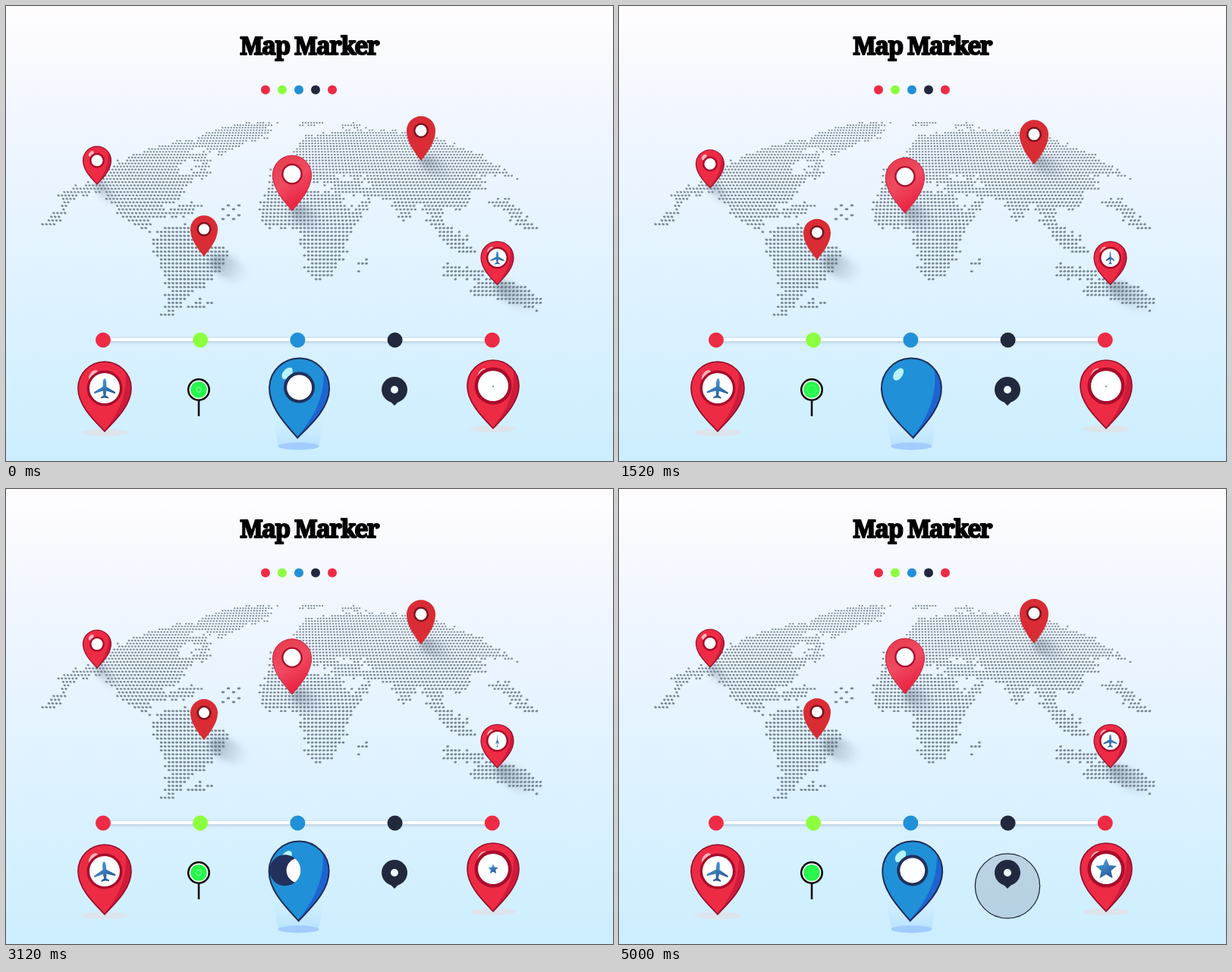
An HTML page with a canvas for the animation above (5040 ms loop, 800 px wide and 600 px high).

```html
<!DOCTYPE html>
<html lang="en">
<head>
<meta charset="utf-8">
<title>Map Marker</title>
<style>
  html, body { margin: 0; width: 100%; height: 100%; overflow: hidden; }
  canvas { display: block; }
</style>
</head>
<body>
<canvas id="stage" width="800" height="600"></canvas>
<script>
const LOOP = 5040, TAU = Math.PI * 2;
const RED = '#ee2b45', GREEN = '#8cff3f', BLUE = '#2090d8', DARK = '#22293f';
const COLORS = [RED, GREEN, BLUE, DARK, RED];

const stage = document.getElementById('stage').getContext('2d');
const backdrop = document.createElement('canvas');
backdrop.width = 800;
backdrop.height = 600;

const northLand = [
  'M118 235L146 206L180 190L226 178L264 176L240 198L262 190L272 222L240 234L236 248L206 270L200 284L186 282L194 298L180 297L158 284L134 256Z',
  'M47 291L58 276L72 266L70 246L100 235L122 230L122 246L94 250L80 262L72 284Z',
  'M238 186L262 166L310 155L354 152L340 174L310 182L288 197L262 186Z',
  'M203 271L240 259L266 262L232 278L205 280Z'
];
const southLand = [
  'M208 290L246 288L262 312L292 318L290 335L276 358L250 375L232 392L216 412L204 410L214 378L206 350L193 325L196 305Z',
  'M238 398L252 385L268 392L262 400Z',
  'M342 243L392 236L440 246L452 268L483 251L470 276L454 298L448 325L430 354L412 366L398 352L392 318L384 296L344 291L332 278Z',
  'M464 334L475 330L471 350L463 351Z',
  'M612 369L640 357L690 372L705 386L696 402L668 392L640 384L616 385Z'
];
const eastLand = [
  'M346 240L352 214L378 200L384 182L398 170L440 165L490 163L520 165L570 176L625 196L680 230L650 222L625 225L632 245L610 240L614 262L592 270L580 262L575 285L566 270L545 262L522 288L508 258L478 250L440 247L400 240L376 234Z',
  'M545 262L572 268L580 292L604 304L618 322L600 330L586 320L568 300Z',
  'M636 258L662 252L700 294L690 301L664 279Z',
  'M566 338L588 342L640 350L628 361L585 359Z',
  'M388 152L418 152L416 158L388 158ZM440 154L472 156L472 161L440 159Z'
];
// Bays and inland seas
const water = 'M222 216L242 200L256 208L238 224ZM376 240L396 230L424 236L432 247L400 242ZM434 224L452 222L456 232L440 231ZM466 224L474 222L478 240L470 238Z';

function disc(c, x, y, r, color) {
  c.beginPath();
  c.arc(x, y, r, 0, TAU);
  c.fillStyle = color;
  c.fill();
}

function oval(c, x, y, rx, ry, color, angle = 0) {
  c.beginPath();
  c.ellipse(x, y, rx, ry, angle, 0, TAU);
  c.fillStyle = color;
  c.fill();
}

function drop(x, y, r, tip) {
  const p = new Path2D(), h = tip - y;
  p.moveTo(x, tip);
  p.bezierCurveTo(x - r * .33, y + h * .78, x - r, y + h * .42, x - r, y);
  p.arc(x, y, r, Math.PI, TAU);
  p.bezierCurveTo(x + r, y + h * .42, x + r * .33, y + h * .78, x, tip);
  p.closePath();
  return p;
}

// Glossy drop with a darker right flank and an outline
function glossy(c, x, y, r, tip, [fill, flank, edge, shine]) {
  const body = drop(x, y, r, tip);
  c.save();
  c.clip(body);
  c.fillStyle = flank;
  c.fill(body);
  c.beginPath();
  c.moveTo(x - r, tip);
  c.lineTo(x - r * .04, tip);
  c.quadraticCurveTo(x + r * .92, y + r * .5, x + r * .78, y - r * .65);
  c.lineTo(x + r * .5, y - r * 1.1);
  c.lineTo(x - r * 1.1, y - r * 1.1);
  c.fillStyle = fill;
  c.fill();
  oval(c, x - r * .42, y - r * .48, r * .23, r * .14, shine, -.9);
  c.restore();
  c.strokeStyle = edge;
  c.lineWidth = Math.max(1.2, r * .05);
  c.stroke(body);
}

const redSkin = [RED, '#cf1b3b', '#95102c', '#ffb3ba'];
const blueSkin = [BLUE, '#1d64d2', '#1f2b55', '#b8f4ff'];

function redPin(c, x, y, r, tip, ring, hole) {
  glossy(c, x, y, r, tip, redSkin);
  disc(c, x, y, ring, '#a80c2b');
  disc(c, x, y, hole, '#fff');
}

function flatPin(c, x, y, r, tip, ring, hole) {
  c.fillStyle = '#d92c34';
  c.fill(drop(x, y, r, tip));
  disc(c, x, y, ring, '#7c1220');
  disc(c, x, y, hole, '#fff');
}

function centerPin(c, dy) {
  const body = drop(377, 222.5 + dy, 25.5, 270 + dy);
  const g = c.createLinearGradient(355, 200 + dy, 395, 260 + dy);
  g.addColorStop(0, '#e63c4c');
  g.addColorStop(.5, '#f04a61');
  g.addColorStop(1, '#e91f3e');
  c.fillStyle = g;
  c.fill(body);
  c.strokeStyle = '#c91f38';
  c.lineWidth = 1;
  c.stroke(body);
  disc(c, 377, 221.5 + dy, 13.8, '#a8122e');
  disc(c, 377, 221.5 + dy, 11.4, '#fff');
}

function polygon(c, points, top, bottom) {
  const g = c.createLinearGradient(-8, -14, 8, 14);
  g.addColorStop(0, top);
  g.addColorStop(1, bottom);
  c.beginPath();
  points.forEach(([x, y]) => c.lineTo(x, y));
  c.closePath();
  c.fillStyle = g;
  c.fill();
}

const wing = [[0, -14], [1.6, -12.5], [2.3, -9], [2.3, -3], [14, 4], [14, 6.2], [2.3, 2.6], [1.5, 8.5], [5.2, 11], [5.2, 12.6], [0, 11.6]];
const planeShape = [...wing, ...wing.map(([x, y]) => [-x, y]).reverse()];
const starShape = Array.from({ length: 10 }, (_, i) => {
  const r = i % 2 ? 6.8 : 14.5, a = i * TAU / 10;
  return [r * Math.sin(a), -r * Math.cos(a)];
});

function icon(c, shape, x, y, sx, sy, angle = 0) {
  c.save();
  c.translate(x, y);
  c.rotate(angle);
  c.scale(sx, sy);
  polygon(c, shape, '#4aa5e6', '#234a86');
  c.restore();
}

function smudge(c, x, y, length, width, angle) {
  c.save();
  c.translate(x, y);
  c.rotate(angle);
  c.filter = 'blur(4px)';
  const g = c.createLinearGradient(0, 0, length, 0);
  g.addColorStop(0, 'rgba(80,95,110,.5)');
  g.addColorStop(1, 'rgba(130,150,165,0)');
  oval(c, length / 2, 0, length / 2, width, g);
  c.restore();
}

function drawMap(c) {
  const land = new Path2D([...northLand, ...southLand, ...eastLand].join(''));
  const sea = new Path2D(water);
  c.fillStyle = '#7a8894';
  for (let y = 154; y < 414; y += Math.min(5.2, 3.2 + (y - 150) / 75)) {
    const spread = Math.min(1, .72 + (y - 150) / 500);
    const size = Math.min(1, .62 + (y - 150) / 400);
    for (let u = -420; u < 420; u += 5.1) {
      const x = 385 + u * spread;
      // Wobble the lookup so that the coasts come out ragged
      const px = x + 4 * Math.sin(y * .8 + x * .23);
      const py = y + 2 * Math.sin(x * .41 + y * .3);
      if (!c.isPointInPath(land, px, py) || c.isPointInPath(sea, px, py)) continue;
      c.beginPath();
      c.ellipse(x, y, 1.95 * size, 1.45 * size, -u / 900, 0, TAU);
      c.fill();
    }
  }
  for (let i = 0; i < 8; i++) {
    oval(c, 286 + i % 4 * 7, 268 + (i >> 2) * 13 - i % 2 * 5, 2.4, 1.4, '#7a8894');
  }
}

function drawBackdrop(c) {
  const sky = c.createLinearGradient(0, 0, 0, 600);
  sky.addColorStop(0, '#fffdfe');
  sky.addColorStop(.25, '#f1f6ff');
  sky.addColorStop(1, '#cceeff');
  c.fillStyle = sky;
  c.fillRect(0, 0, 800, 600);

  c.font = '900 32px "Noto Serif", serif';
  c.textAlign = 'center';
  c.letterSpacing = '-1.7px';
  c.fillStyle = c.strokeStyle = '#000';
  c.lineWidth = 1.8;
  c.lineJoin = 'round';
  c.fillText('Map Marker', 399.5, 63.5);
  c.strokeText('Map Marker', 399.5, 63.5);

  drawMap(c);
  smudge(c, 119, 232, 42, 7, .85);
  smudge(c, 270, 334, 54, 14, .45);
  smudge(c, 377, 266, 50, 13, .6);
  smudge(c, 546, 201, 50, 11, .5);
  smudge(c, 645, 366, 66, 12, .55);

  c.save();
  c.shadowColor = 'rgba(90,100,120,.35)';
  c.shadowBlur = 4;
  c.shadowOffsetY = 1;
  c.fillStyle = '#fff';
  c.fillRect(128, 438, 513, 4);
  c.restore();
  COLORS.forEach((color, i) => {
    disc(c, 342 + 22 * i, 110.5, 6, color);
    disc(c, 128 + 128.2 * i, 440.5, 10, color);
  });

  oval(c, 130, 562.5, 31, 5, '#dde4ec');
  oval(c, 642, 557.5, 30, 5, '#dde4ec');
  redPin(c, 130, 504, 35, 561, 23.5, 20);
  redPin(c, 642, 501, 34, 557, 24.5, 20);
  redPin(c, 647.5, 332, 21.5, 367.5, 14.5, 12);

  const beam = c.createLinearGradient(0, 525, 0, 583);
  beam.addColorStop(0, 'rgba(225,246,255,0)');
  beam.addColorStop(1, 'rgba(172,220,255,.75)');
  c.fillStyle = beam;
  c.fill(new Path2D('M349 525H422L412 581H359Z'));
  oval(c, 385.5, 580.5, 27, 5, '#a2ccff');
}

// The socket sweeps leftwards, resting briefly at the middle
function socketX(phase) {
  const p = phase > .5 ? phase - 1 : phase;
  return 386 + 437 * Math.max(0, -p - .04) - 190 * Math.max(0, p);
}

function bluePin(c, phase) {
  c.save();
  c.translate(386, 520);
  c.rotate(.055 * Math.cos(TAU * (phase - .87)));
  c.translate(-386, -520);
  glossy(c, 386, 504, 39.5, 569.5, blueSkin);
  // The white core stays put and shows only through the moving socket
  c.clip(drop(386, 504, 39.5, 569.5));
  disc(c, socketX(phase), 503, 20.5, '#22305c');
  c.clip();
  disc(c, 386, 503, 16.5, '#fff');
  c.restore();
}

function greenPin(c, phase) {
  c.fillStyle = '#000';
  c.fillRect(252.8, 519, 2.5, 22);
  disc(c, 254, 506, 15, '#000');
  disc(c, 254, 506, 12.5, '#fff');
  disc(c, 254, 506, 10.8, '#28f64c');
  c.beginPath();
  c.arc(254, 506, 3 + 6 * phase, 0, TAU);
  c.strokeStyle = `rgba(150,255,165,${.6 * (1 - phase)})`;
  c.lineWidth = 1.5;
  c.stroke();
}

function darkPin(c, t) {
  const radius = 52 - 130 * Math.abs(t / 1440 % 1 - .545);
  if (radius > 6) {
    disc(c, 512, 523.5, radius, 'rgba(34,41,63,.14)');
    c.strokeStyle = DARK;
    c.lineWidth = 1.3;
    c.stroke();
  }
  disc(c, 512, 506, 17, DARK);
  c.fill(new Path2D('M505 520H519L512 527Z'));
  disc(c, 512, 506, 5, '#eef8fd');
}

function draw(t) {
  const c = stage;
  const beat = t / 1008 % 1;
  const bob = (1 - Math.cos(TAU * (beat + .06))) / 2;
  c.drawImage(backdrop, 0, 0);

  redPin(c, 120, 203.5 + 5 * bob, 18.5, 235 + 5 * bob, 10, 7.5);
  flatPin(c, 261, 294 + 5 * bob, 18, 330 + 5 * bob, 9.5, 7);
  flatPin(c, 547, 164 + 5.6 * bob, 19, 204 + 5.6 * bob, 10, 7.5);
  centerPin(c, 3.4 * bob);

  icon(c, planeShape, 130, 505, 1, 1, .07 * Math.sin(TAU * t / 4000));
  icon(c, planeShape, 647.5, 332.5, .65 * Math.cos(Math.PI * t / 560), .65);

  const grow = Math.min(1, Math.max(0, (t / 720 % 1 - .12) / .48));
  const star = .1 + .9 * grow * grow * (3 - 2 * grow);
  icon(c, starShape, 642, 501.5, star, star);

  greenPin(c, beat);
  bluePin(c, beat);
  darkPin(c, t);
}

function tick() {
  draw(performance.now() % LOOP);
  requestAnimationFrame(tick);
}

drawBackdrop(backdrop.getContext('2d'));
tick();
</script>
</body>
</html>
```
